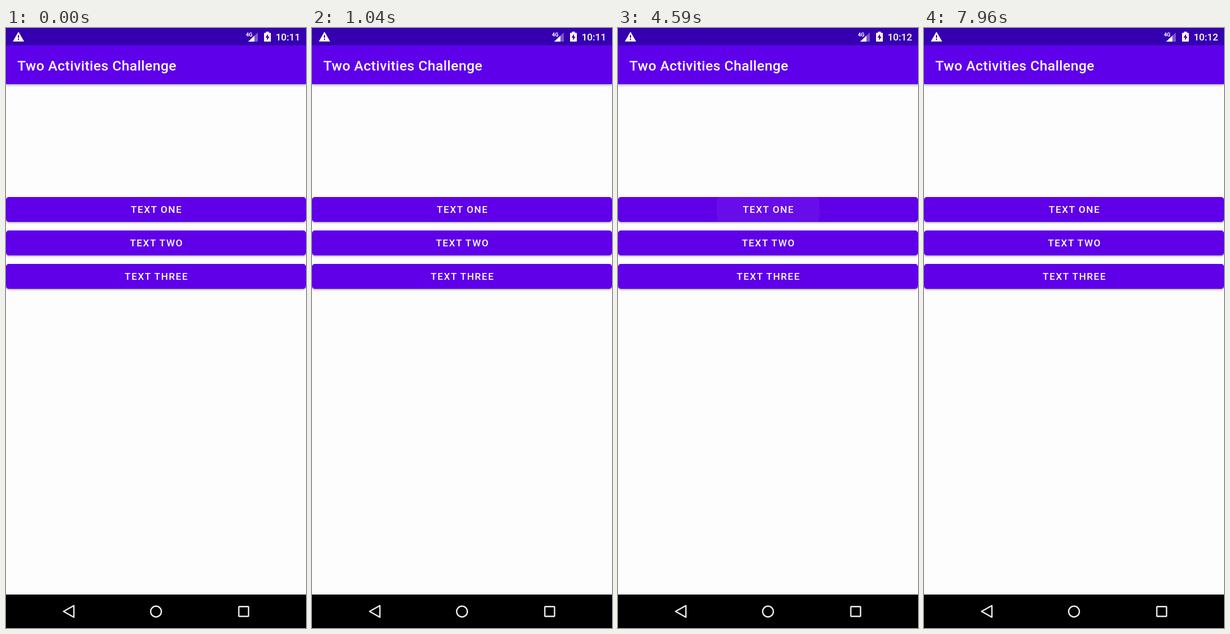
Write an HTML page that moves like this. It is 529 px wide and 1058 px high and loops after 8000 ms.

```html
<!DOCTYPE html>
<html lang="en">
<head>
<meta charset="utf-8">
<title>Two Activities Challenge</title>
<style>
  html, body { margin: 0; width: 100%; height: 100%; overflow: hidden; background: #fdfdfe; }
  #stage { position: relative; width: 529px; height: 1058px; overflow: hidden; background: #fdfdfe; }
  #bar { position: absolute; top: 30px; width: 529px; height: 69px; background: #5f00eb; box-shadow: 0 2px 4px rgba(0, 0, 0, .32); }
  .button { position: absolute; width: 529px; height: 44px; border-radius: 5px; overflow: hidden; background: #5f00e9; }
  .ripple { position: absolute; left: 264.5px; top: 22px; width: 0; height: 0; border-radius: 50%; background: #fff; transform: translate(-50%, -50%); }
  svg { position: absolute; inset: 0; }
  text { font-family: Roboto, sans-serif; font-weight: 500; fill: #fff; }
  .label { font-size: 17.1px; letter-spacing: 1.53px; text-anchor: middle; }
</style>
</head>
<body>
<div id="stage">
  <div id="bar"></div>
  <div class="button" style="top:298px"><div class="ripple"></div></div>
  <div class="button" style="top:357px"></div>
  <div class="button" style="top:415.5px"></div>
  <svg width="529" height="1058" viewBox="0 0 529 1058">
    <rect width="529" height="30.5" fill="#3500b0"/>
    <g fill="#fff">
      <path d="M22 7L31.5 23.5H12.5Z" stroke="#fff" stroke-width=".6" stroke-linejoin="round"/>
      <path d="M21 12.5h2v5h-2zM21 19h2v2h-2z" fill="#3500b0"/>
      <path d="M444 8V24H427Z" opacity=".35"/>
      <path d="M438 13.6V24H427Z"/>
      <path d="M458.5 6.5h5v2h2.2q1.3 0 1.3 1.3v13q0 1.2-1.3 1.2h-9.4q-1.3 0-1.3-1.2v-13q0-1.3 1.3-1.3h2.2z"/>
      <path d="M462 10.5L457.5 17H460.2V21.8L464.6 15.2H462Z" fill="#3500b0"/>
    </g>
    <text x="423" y="15.2" style="font-size:9.3px;font-weight:700">4G</text>
    <text id="clock" x="475.4" y="22.2" style="font-size:17.1px">10:11</text>
    <text x="20" y="74.6" style="font-size:24.5px;letter-spacing:.44px">Two Activities Challenge</text>
    <text class="label" x="265.5" y="326.3">TEXT ONE</text>
    <text class="label" x="265.5" y="385.2">TEXT TWO</text>
    <text class="label" x="265.5" y="443.9">TEXT THREE</text>
    <rect y="999" width="529" height="59"/>
    <g fill="none" stroke="#eee" stroke-width="2.4" stroke-linejoin="round">
      <path d="M101.5 1028.7L119.7 1018.5V1039Z"/>
      <circle cx="264.5" cy="1029" r="9.5"/>
      <rect x="410.5" y="1020.3" width="17.2" height="17.2" rx="1"/>
    </g>
  </svg>
</div>
<script>
  const LOOP = 8000;
  const CLOCK_TICK = 4290;
  const presses = [
    { down: 4580, full: 4840, up: 4880, end: 5170 },
    { down: 5920, full: 6200, up: 6460, end: 6750 }
  ];
  const buttons = [...document.querySelectorAll('.button')];
  const ripple = document.querySelector('.ripple');
  const clock = document.getElementById('clock');

  const progress = (t, from, to) => Math.min(1, Math.max(0, (t - from) / (to - from)));
  const easeOut = p => 1 - (1 - p) ** 2;

  // Lift 0 is a resting button, 1 a raised one.
  function setLift(button, lift) {
    button.style.boxShadow =
      `0 ${2 + 4 * lift}px ${3 + 5 * lift}px rgba(0, 0, 0, ${.26 + .08 * lift})`;
  }

  function draw(t) {
    clock.textContent = t < CLOCK_TICK ? '10:11' : '10:12';
    const press = presses.find(p => t >= p.down && t < p.end);
    const spread = press ? easeOut(progress(t, press.down, press.full)) : 0;
    const strength = press ? Math.min(1, (t - press.down) / 90) * (1 - progress(t, press.up, press.end)) : 0;
    ripple.style.width = ripple.style.height = `${150 + 390 * spread}px`;
    ripple.style.opacity = .43 * strength;
    setLift(buttons[0], spread * strength);
  }

  function tick() {
    draw(performance.now() % LOOP);
    requestAnimationFrame(tick);
  }

  buttons.forEach(button => setLift(button, 0));
  tick();
</script>
</body>
</html>
```
